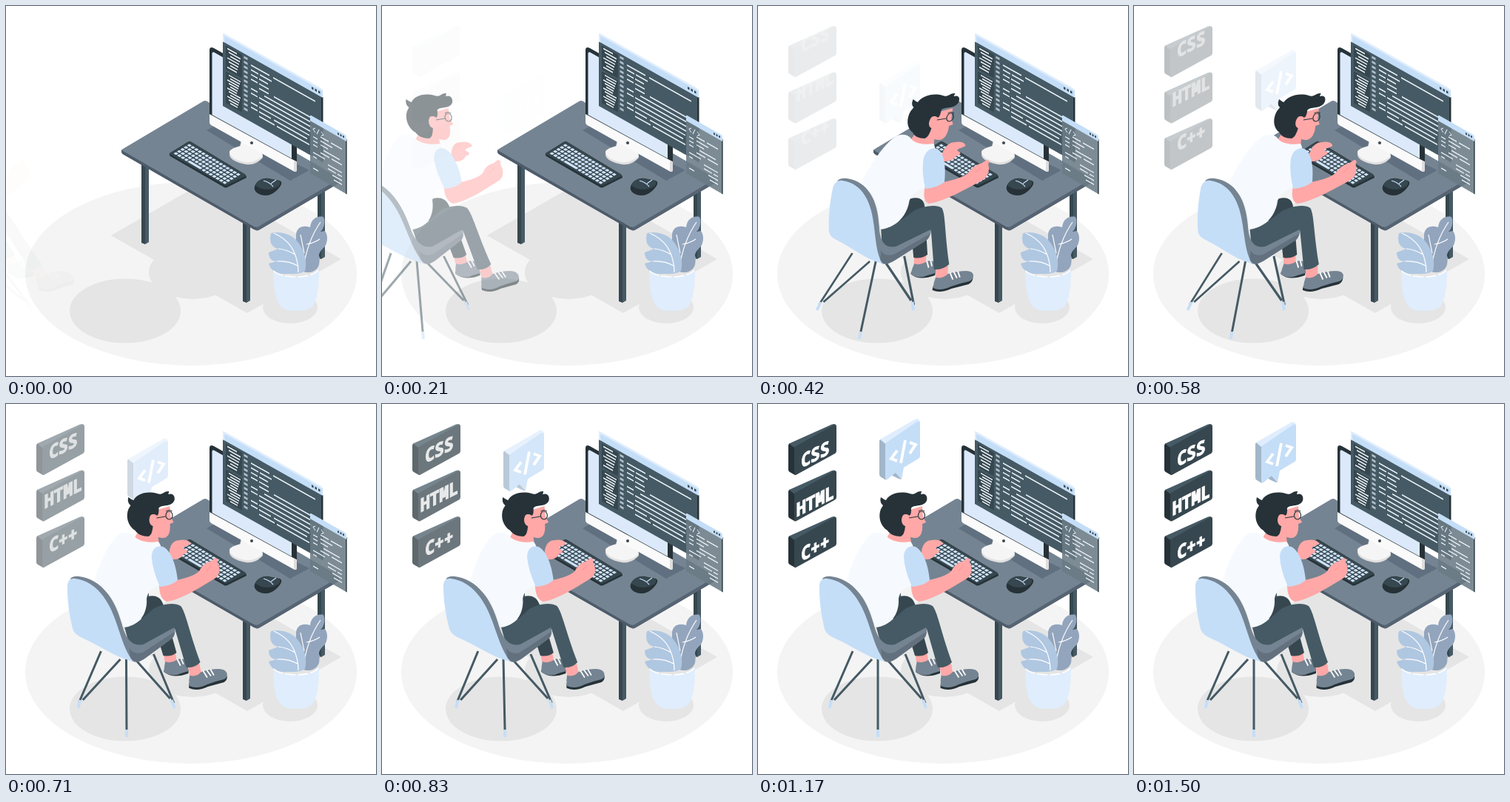
An HTML page that plays this animation: 500 px wide and 500 px high, repeating every 1.54 s.

```html
<!DOCTYPE html>
<html lang="en">
<head>
<meta charset="utf-8">
<title>Developer at work</title>
<style>
  html, body { margin: 0; width: 100%; height: 100%; overflow: hidden; background: #fff; }
  svg { display: block; width: 100vw; height: 100vh; }
  .dark { fill: #263238; }
  .slate { fill: #37474f; }
  .steel { fill: #455a64; }
  .grey { fill: #758492; }
  .sky { fill: #c5def8; }
  .pale { fill: #dfedfd; }
  .skin { fill: #ffa8a7; }
  .shade { fill: #e5e5e5; }
  .rod { fill: none; stroke: #455a64; stroke-width: 3; }
  .tip { fill: none; stroke: #c5def8; stroke-width: 4; }
  .lace { fill: none; stroke: #fff; stroke-width: 1.7; stroke-linecap: round; }
  .code { fill: none; stroke: #eef4fa; stroke-width: 1.7; }
  .label {
    font: 700 25px "Noto Sans Mono", "DejaVu Sans Mono", monospace;
    fill: #fff; stroke: #fff; stroke-width: 1.3; text-anchor: middle;
  }
</style>
</head>
<body>
<svg viewBox="0 0 500 500">
  <defs>
    <g id="badge" stroke-linejoin="round">
      <path class="dark" d="M41 56Q41 54 43 53L50 57V96L43 92Q41 91 41 89Z"/>
      <path class="steel" d="M42 53.500L100 27.500Q105 25.500 106 30L49 59Z"/>
      <path class="slate" d="M49 60Q49 58 51 57L102 28.500Q106 27 106 31V63Q106 66 103 67.500L52 95.500Q49 97 49 94Z"/>
    </g>
  </defs>

  <!-- floor -->
  <ellipse cx="250" cy="362" rx="224" ry="124" fill="#f4f4f4"/>
  <path class="shade" d="M142 310L269 237L453 342L326 415Z"/>
  <ellipse class="shade" cx="252" cy="360" rx="59" ry="36"/>
  <ellipse class="shade" cx="161" cy="412" rx="75" ry="43.500"/>
  <ellipse class="shade" cx="384" cy="407" rx="37" ry="22"/>

  <!-- desk -->
  <g id="legs"></g>
  <path d="M156 194V198Q157 200 159 201L335 302Q339 304 343 302L449 240V233L338 290Z" fill="#4d5b69"/>
  <path d="M338 298V303.500Q341 303.500 343 302L450 239V233Z" fill="#566473"/>
  <path class="grey" d="M159 192.500L266 129Q269 127 272 129L449 231.500Q451 233 449 234.500L342 297.500Q338 300 334 297.500L159 196.500Q155 194.500 159 192.500Z"/>
  <path d="M271 168L285 160L410 222L384 236Z" fill="#617080"/>

  <!-- keyboard -->
  <path class="dark" d="M221 199L246 183.500Q248 182.500 250 183.500L323 227.500Q325 229 325 232L299 245Q296 246 294 244.500L222 203Q220 201 221 199Z"/>
  <path class="slate" d="M222 198.500L246 184Q248 183 250 184L323 227.500Q325 229 323 230.500L299 242Q297 243 295 242L222 200.500Q220 199.500 222 198.500Z"/>
  <g id="keys" transform="matrix(4.700 2.800 -4.700 2.650 247.500 185.200)" fill="#cfe2f7"></g>

  <!-- mouse -->
  <path class="dark" d="M336 244C338 237 346 232 355 233L370 236Q374 238 371 243C367 249 360 256 351 256C341 256 334 250 336 244Z"/>
  <path class="slate" d="M337 242C340 236 347 232.500 355 233.500L368 236C372 238 371 241 367 244C360 249 345 250 337 242Z"/>
  <path d="M348 236Q356 238 361 244M358 240L365 235" fill="none" stroke="#c5def8" stroke-width="1.200"/>

  <!-- monitor -->
  <path d="M302 197Q303 193 316 190L318 181L346 196L347 205Q337 216 324 214Q303 210 302 201Z" fill="#e0e0e0"/>
  <path d="M302 197Q304 192 317 189L319 181L345 196L347 203Q335 213 323 211Q303 207 302 197Z" fill="#f5f5f5"/>
  <path class="dark" d="M275 60Q275 54 281 57L389 118Q393 120 393 125V212L275 148Z"/>
  <path d="M278.500 64Q279 61 282 63L386 122V206L278.500 147Z" fill="#dbe9fb"/>
  <path d="M275 146L393 210.500V221Q393 225 389 223.500L279 162Q275 160 275 157Z" fill="#fafafa"/>
  <path d="M389 208.500L393 210.500V221Q393 225 389 223.500Z" fill="#ddd"/>
  <circle cx="332" cy="185" r="2" class="slate"/>

  <!-- editor window -->
  <g transform="matrix(1 .563 0 1 293 38)">
    <path class="steel" d="M0 4H135V97H0Z"/>
    <path class="dark" d="M133 9H135.500V97H133Z"/>
    <path class="slate" d="M4 13H26V45H4ZM4 48H26V91H4Z"/>
    <path class="sky" d="M0 1Q0-1 2-1H133Q135-1 135 1V10H0Z"/>
    <path class="pale" d="M0 1Q0-2 2-2H133L135 1H2V10H0Z"/>
    <path d="M120 5h2.500m2 0h2.500m2 0h2.500" stroke="#37474f" stroke-width="3"/>
    <path id="editor" class="code"/>
    <path id="gutter" class="code" style="stroke:#b3c1cc;stroke-width:3"/>
  </g>

  <!-- small window -->
  <g transform="matrix(1 .571 0 1 411 148)">
    <path d="M0 4H49V78H0Z" fill="#6b7b86" fill-opacity=".88"/>
    <path class="slate" d="M48 4H49.700V78H48Z"/>
    <path class="sky" d="M0 1Q0-1 2-1H47Q49-1 49 1V7H0Z"/>
    <path d="M37 3h2m1.500 0h2m1.500 0h2" stroke="#37474f" stroke-width="2.500"/>
    <path d="M7 13l-3 3 3 3m5-7l-3 8m6-7l3 3-3 3" fill="none" stroke="#e4edf6" stroke-width="1"/>
    <path id="snippet" class="code" style="stroke-width:1.400"/>
  </g>

  <!-- plant -->
  <path d="M429 285C419 283 412 289 411 299C400 295 391 300 392 312L391 332L396 356C405 363 419 361 423 350L424 340C421 336 425 330 431 325C435 318 435 309 431 304L425 305C430 301 432 291 429 285Z" fill="#93a5bd"/>
  <path d="M425 292Q407 318 402 354M403 334L398 309M406 322Q417 320 424 315" fill="none" stroke="#fff" stroke-width="1.200"/>
  <path d="M358 307C370 304 384 308 392 316C402 327 408 344 404 358Q399 362 388 362H374C364 361 357 356 355 348L366 345C359 345 355 341 355 333L368 328C359 327 355 318 358 307Z" fill="#b0c7e1"/>
  <path d="M362 307Q382 316 389 332Q395 345 395 360M391 336Q379 329 368 328M394 351Q382 344 366 345" fill="none" stroke="#fff" stroke-width="1.200"/>
  <path class="pale" d="M361 357Q361 390 369 403Q374 412 392 412Q411 412 416 403Q423 390 423 356Q414 366 392 366Q370 366 361 357Z"/>
  <path d="M362 358Q370 366 392 366Q414 366 422 357" fill="none" stroke="#fff" stroke-width="1.500" stroke-dasharray="14 3"/>

  <g id="badges"></g>
  <g id="labels"></g>

  <!-- speech bubble, resting place -->
  <g id="bubble">
    <path d="M164 55Q164 52 166 52L173 56V107L166 103Q164 102 164 99Z" fill="#a2b6c9"/>
    <path d="M180 100L186 97L194 106Q190 106 180 100Z" fill="#a2b6c9"/>
    <path class="pale" d="M165 52L213 24.500Q217 23 219 28L172 58Z"/>
    <path class="sky" d="M172 60Q172 57 174 56L215 28Q219 26 219 30V74Q219 77 217 78L197 90L194 106L186 97L175 106Q172 107 172 104Z"/>
    <path d="M188 67L180 78L188 81M199 53L193 84M205 56L213 59L205 71" fill="none" stroke="#fff" stroke-width="3.800"/>
  </g>

  <g id="person">
    <!-- far leg -->
    <path class="dark" d="M213 362Q225 372 246 364V359H213Z"/>
    <path class="grey" d="M215 346Q213 355 213 362Q224 370 236 364L246 361V350Q240 342 230 345Z"/>
    <path class="skin" d="M212 335L228 333L230 346Q222 351 214 348Z"/>
    <path class="lace" d="M231 345l4 8m1-9l3 7"/>
    <path class="slate" d="M186 263C194 257 208 257 212 270L230 336Q223 342 212 340L200 300L182 290Z"/>

    <!-- chair legs -->
    <path class="rod" d="M128 334L98 403M154 345L103 400M162 344V441M175 346L221 398M199 338L226 404"/>
    <path class="tip" d="M99.500 400L96.500 411M162 440V450M223 400L227 411"/>

    <!-- near leg -->
    <path class="dark" d="M247 377Q246 384 247 384Q258 389 272 382L294 376Q299 373 298 367Z"/>
    <path class="grey" d="M248 364Q246 373 247 381Q258 386 271 379Q281 375 294 372Q299 370 298 364Q296 358 287 358Q275 358 263 362Z"/>
    <path class="skin" d="M245 353L261 351L263 362Q258 369 248 367Z"/>
    <path class="lace" d="M266 361l5 8m0-9l5 7m0-8l4 7"/>
    <path class="steel" d="M160 302C175 300 190 284 200 276C213 269 229 268 236 273C243 282 246 304 262 349Q255 357 243 356L228 304C215 314 200 322 186 328L168 332Z"/>

    <!-- far hand -->
    <path class="skin" d="M221 207C220 195 224 184 235 184C243 182 250 186 250 189C246 192 241 192 240 195L245 198Q246 201 240 203C237 210 229 210 223 210Z"/>

    <!-- head -->
    <path class="skin" d="M188 148L222 138L223 152L227 160L222 162C223 173 220 182 211 181L206 180L207 187C196 191 182 188 174 181L181 168Z"/>
    <path class="dark" d="M169 137C165 134 165 129 166 126Q170 129 173 130C177 122 190 117 205 121C212 124 214 117 221 118L220 122Q226 120 228 125C230 132 225 136 218 137C212 138 206 138 207 143C207 150 205 152 203 150C196 147 193 152 196 160L199 165Q198 177 193 179C185 179 178 176 175 171C165 165 162 152 166 142Z"/>
    <ellipse class="skin" cx="200" cy="157" rx="6" ry="8"/>
    <path d="M204 154L216 152M217 145Q221 142 225 145" fill="none" stroke="#263238" stroke-width="1.200"/>
    <ellipse cx="221" cy="150.500" rx="4.500" ry="5.500" fill="none" stroke="#263238" stroke-width="1.200"/>

    <!-- torso and near arm -->
    <path d="M119 242C126 215 139 188 152 177C160 171 171 174 176 181C186 188 199 187 206 186C215 194 210 225 208 245C199 247 191 254 190 263C191 277 185 290 177 295Q169 301 159 301C152 272 138 246 119 242Z" fill="#f6faff"/>
    <path class="skin" d="M207 244L231 238C245 235 256 231 261 226C265 218 272 213 276 213L283 208Q288 208 286 214C290 221 290 231 282 236L262 248C247 257 228 266 217 267C209 264 207 254 207 244Z"/>
    <path d="M271 225L278 218" stroke="#ff8f90" stroke-width="1"/>
    <path class="sky" d="M197 207C197 196 204 190 213 193C225 200 230 220 232 238Q223 246 208 247Q198 224 197 207Z"/>

    <!-- chair shell -->
    <path class="grey" d="M87 236Q91 232 99 233C129 237 147 263 156 296C161 316 169 328 185 325L227 302Q230 309 225 316L187 344Q175 352 168 346L140 300Z"/>
    <path d="M166 330Q172 339 184 336L227 308Q228 312 225 316L187 344Q175 352 168 346Z" fill="#63717f"/>
    <path class="sky" d="M83 250C82 240 86 235 94 236C122 240 139 265 149 296C156 317 160 330 166 340Q170 349 177 349C155 346 133 331 111 320C96 313 91 311 89 300C85 283 83 265 83 250Z"/>
  </g>
</svg>

<script>
const LOOP = 1540, STEP = 1000 / 24;
const $ = id => document.getElementById(id);
const mix = (a, b, p) => a + (b - a) * p;
const clamp = v => Math.max(0, Math.min(1, v));

// Cubic bezier easing, solved by bisection.
function bezier(x1, y1, x2, y2) {
  const at = (a, b, s) => 3 * (1 - s) ** 2 * s * a + 3 * (1 - s) * s * s * b + s ** 3;
  return x => {
    if (x <= 0) return 0;
    if (x >= 1) return 1;
    let lo = 0, hi = 1;
    for (let i = 0; i < 24; i++) {
      const s = (lo + hi) / 2;
      if (at(x1, x2, s) < x) lo = s; else hi = s;
    }
    return at(y1, y2, lo);
  };
}

// Segments of code: [row, from, to, ...]
const segments = (rows, top, gap) => rows.map(([r, ...xs]) => {
  let d = '';
  for (let i = 0; i < xs.length; i += 2) d += `M${xs[i]} ${top + r * gap}H${xs[i + 1]}`;
  return d;
}).join('');

function buildScene() {
  $('legs').innerHTML = [[183, 205, 321], [320, 285, 400], [421, 240, 341]].map(([x, a, b]) =>
    `<path class="slate" d="M${x} ${a}H${x + 5}V${b + 1}L${x} ${b - 1}Z"/>` +
    `<path class="steel" d="M${x + 5} ${a}H${x + 10}V${b - 2}L${x + 5} ${b + 1}Z"/>`).join('');

  let keys = '';
  for (let r = 0; r < 5; r++)
    for (let c = 0; c < 15; c++) {
      if (r === 4 && c > 3 && c < 8) continue;
      keys += `<rect x="${c + .25 + r * .04}" y="${r + .2}" width=".74" height=".7" rx=".12"/>`;
    }
  $('keys').innerHTML = keys + '<rect x="4.400" y="4.200" width="3.700" height=".7"/>';

  let side = '';
  for (let i = 0; i < 18; i++) {
    const y = i < 7 ? 16 + i * 4.2 : 51 + (i - 7) * 3.7;
    side += `M${6 + i % 3 * 2} ${y}H${19 + i * 5 % 6}`;
  }
  $('editor').setAttribute('d', side + segments([
    [0, 38, 63, 68, 125], [1, 38, 48, 50, 66], [2, 38, 47, 49, 61],
    [3, 38, 47, 49, 62], [4, 49, 62, 69, 125], [5, 38, 47, 56, 118],
    [6, 38, 47, 49, 121], [7, 49, 118], [8, 38, 47, 49, 117],
    [9, 38, 47, 49, 65, 69, 114], [10, 49, 70, 73, 117]
  ], 20.5, 6.3));

  let marks = '';
  for (let i = 0; i < 12; i++) marks += `M28.500 ${15 + i * 6.3}H33.500`;
  $('gutter').setAttribute('d', marks);

  $('snippet').setAttribute('d', segments([
    [0, 14, 25, 28, 43], [1, 4, 10, 14, 30], [2, 4, 10, 14, 24], [3, 4, 10, 18, 40],
    [4, 14, 26, 29, 43], [5, 4, 20], [6, 4, 9, 24, 43], [7, 24, 35, 37, 43], [8, 30, 43], [9, 4, 11, 32, 43]
  ], 21, 5.3));

  const names = ['CSS', 'HTML', 'C++'];
  $('badges').innerHTML = names.map((_, i) => `<use href="#badge" y="${i * 62.5}"/>`).join('');
  $('labels').innerHTML = names.map((s, i) =>
    `<text class="label" transform="matrix(.85 -.43 0 1 77.500 ${75 + i * 63})">${s}</text>`).join('');
}

const slide = bezier(.36, -.01, .5, 1.38);
const dash = bezier(.3, 0, .5, 1.5);

// Slant and shift of the person: [time, slant, shift]
const POSES = [[0, .364, -255], [600, -.176, 0], [800, .025, 0], [1000, 0, 0]];

function pose(t) {
  if (t >= 1000) return [0, 0];
  const i = Math.max(1, POSES.findIndex(k => t < k[0]));
  const a = POSES[i - 1], b = POSES[i];
  const p = dash((t - a[0]) / (b[0] - a[0]));
  return [mix(a[1], b[1], p), mix(a[2], b[2], p)];
}

function draw(now) {
  const t = Math.max(1, Math.floor((now % LOOP + 4.9) / STEP)) * STEP;
  const [slant, shift] = pose(t);
  const person = $('person');
  person.setAttribute('transform', `matrix(1 0 ${slant} 1 ${shift - 250 * slant} 0)`);
  person.setAttribute('opacity', clamp(dash(t / 600)));

  const p = slide(t / 1500), fade = clamp(p) ** 1.8;
  $('badges').setAttribute('opacity', fade);
  $('labels').setAttribute('opacity', clamp(p));
  $('labels').setAttribute('transform', `translate(0 ${mix(-30, 0, p)})`);
  $('bubble').setAttribute('opacity', fade);
  $('bubble').setAttribute('transform', `translate(0 ${mix(72, 0, p)})`);
}

buildScene();
const start = performance.now();
(function tick() {
  draw(performance.now() - start);
  requestAnimationFrame(tick);
})();
</script>
</body>
</html>
```
